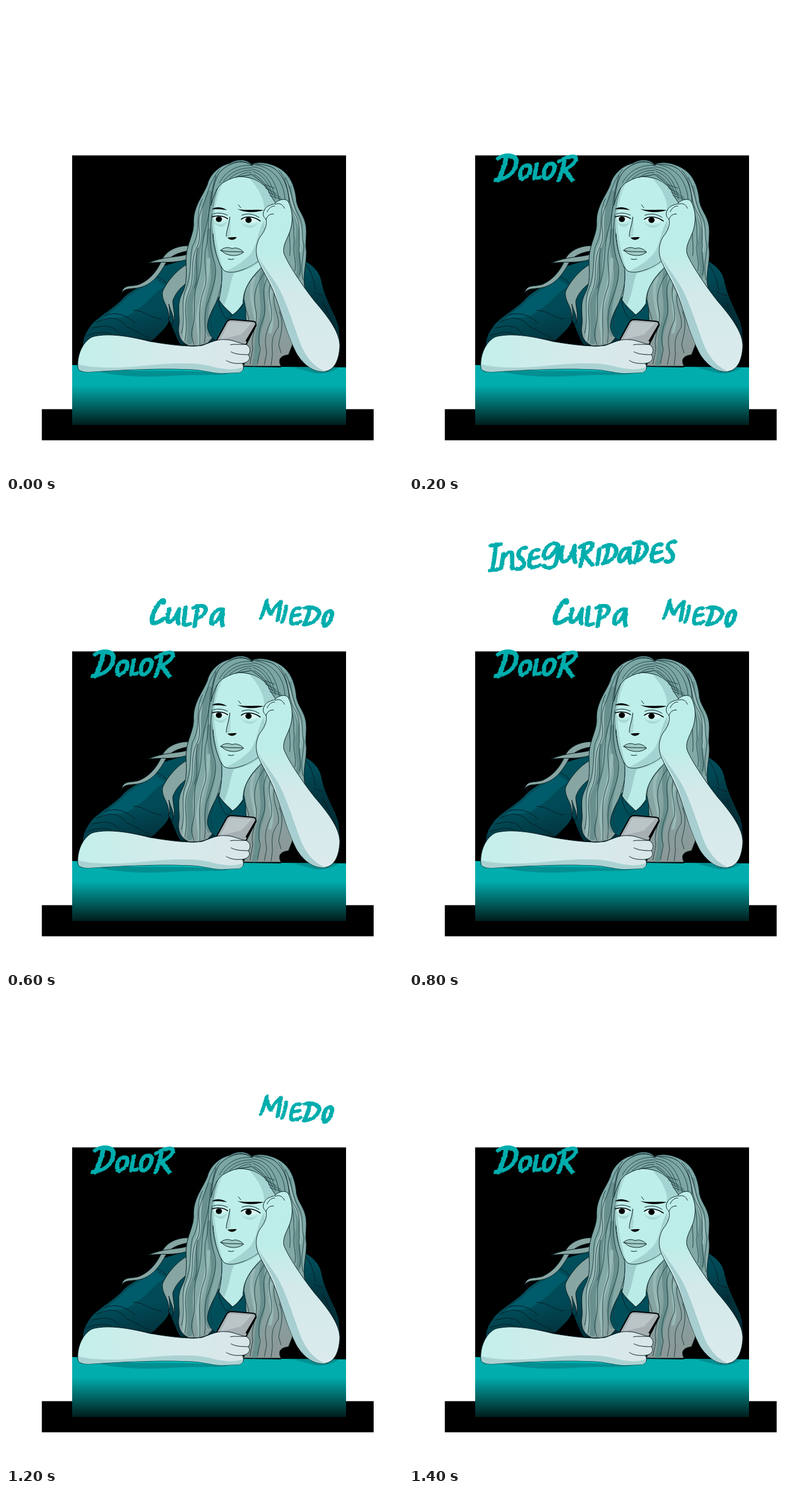
Recreate the animation shown at these times as an HTML page. Size 690 by 812 pixels, loop 1.6 s.

```html
<!DOCTYPE html>
<html lang="es">
<head>
<meta charset="utf-8">
<title>Dolor, miedo, culpa</title>
<style>
html, body { margin: 0; width: 100%; height: 100%; overflow: hidden; background: #fff; }
svg { display: block; width: 690px; height: 812px; }
path { stroke-linecap: round; stroke-linejoin: round; }
.ink { fill: none; stroke: #071c20; stroke-width: 1; }
.edge { stroke: #071c20; stroke-width: 1; }
.strand { fill: none; stroke: #18383b; stroke-width: .9; }
.dark { fill: none; stroke: #688f8e; }
.light { fill: none; stroke: #98bab7; }
.word { fill: none; stroke: #03adad; stroke-width: 5.6; filter: url(#brush); }

.word { opacity: 0; animation: 1.6s step-end infinite; }
.dolor { animation-name: dolor; }
.miedo { animation-name: miedo; }
.culpa { animation-name: culpa; }
.insec { animation-name: insec; }
.scene { animation: nudge 1.6s step-end infinite; }
@keyframes dolor { 0% { opacity: 0 } 12.5%, 100% { opacity: 1 } }
@keyframes miedo { 0%, 87.5%, 100% { opacity: 0 } 25% { opacity: 1 } }
@keyframes culpa { 0%, 75%, 100% { opacity: 0 } 37.5% { opacity: 1 } }
@keyframes insec { 0%, 62.5%, 100% { opacity: 0 } 50% { opacity: 1 } }
@keyframes nudge { 0%, 75%, 100% { transform: none } 62.5% { transform: translateX(-1px) } }
</style>
</head>
<body>
<svg viewBox="0 0 690 812">
<defs>
  <linearGradient id="table" gradientUnits="userSpaceOnUse" x1="0" y1="623" x2="0" y2="727">
    <stop offset=".34" stop-color="#02adad"/><stop offset="1" stop-color="#001c1c"/>
  </linearGradient>
  <linearGradient id="hair" gradientUnits="userSpaceOnUse" x1="380" y1="300" x2="450" y2="620">
    <stop offset="0" stop-color="#7ba7a5"/><stop offset=".6" stop-color="#84a9a6"/><stop offset="1" stop-color="#8b9897"/>
  </linearGradient>
  <linearGradient id="fore">
    <stop offset="0" stop-color="#c3efea"/><stop offset=".6" stop-color="#d7eaeb"/><stop offset="1" stop-color="#d9e6e8"/>
  </linearGradient>
  <linearGradient id="arm" x2="0" y2="1">
    <stop offset=".3" stop-color="#bdede8"/><stop offset=".55" stop-color="#d3e9ea"/><stop offset="1" stop-color="#dcebed"/>
  </linearGradient>
  <linearGradient id="sleeve" gradientUnits="userSpaceOnUse" x1="230" y1="450" x2="260" y2="585">
    <stop offset="0" stop-color="#00505c"/><stop offset=".6" stop-color="#014956"/><stop offset="1" stop-color="#02313b"/>
  </linearGradient>
  <filter id="brush" filterUnits="userSpaceOnUse" x="100" y="40" width="500" height="290">
    <feOffset in="SourceGraphic" dx="1.8" dy="-1.2" result="nib"/>
    <feMerge result="ink"><feMergeNode in="SourceGraphic"/><feMergeNode in="nib"/></feMerge>
    <feTurbulence type="fractalNoise" baseFrequency=".18 .3" numOctaves="2" seed="4" result="grain"/>
    <feDisplacementMap in="ink" in2="grain" scale="3" xChannelSelector="R" yChannelSelector="G"/>
  </filter>
</defs>

<g class="scene">
  <path d="M115 259.300H591V699.400H639V753.600H62.300V699.400H115Z"/>

  <!-- shirt -->
  <path fill="url(#sleeve)" d="M318 438C290 448 262 450 254 468C242 484 214 494 201 510C183 528 154 543 146 557C138 567 133 580 134 590C170 568 210 572 252 581C268 572 279 560 285 548L302 588H480V470L517 441C536 452 546 462 549 482C556 512 571 532 578 557L580 580L530 545L480 480L400 470Z"/>
  <path fill="#006071" opacity=".75" d="M254 470C242 490 216 499 203 513C190 526 173 537 164 546C192 537 210 545 226 527C247 517 253 500 276 486Z"/>
  <path d="M255 581C266 567 278 561 284 545C291 559 293 575 304 588Z"/>
  <g class="ink">
    <path d="M255 468C269 470 278 478 286 492M157 549C180 538 194 538 210 557M150 559C176 552 187 555 198 570M172 537C190 530 208 535 224 550M141 572C158 566 170 564 183 569"/>
    <path d="M210 557C224 562 236 570 251 578M222 528C238 527 252 542 270 543M521 448C530 460 535 475 538 492M535 496C542 500 548 502 553 502M550 515C559 530 566 545 573 560"/>
  </g>

  <!-- loose locks -->
  <g fill="#87a5a2" class="edge">
    <path d="M316 416C295 416 278 426 272 439C263 459 252 474 232 483C216 488 205 482 201 498C207 488 219 492 234 488C256 482 267 464 275 451C283 434 298 428 316 425Z"/>
    <path d="M315 431C294 437 275 434 247 446C272 443 290 447 314 440Z"/>
    <path d="M317 447C298 456 279 479 272 496C270 515 286 521 282 546C286 535 284 525 283 517C286 530 295 541 289 553C297 538 289 525 290 511C295 496 307 485 318 478Z"/>
  </g>

  <!-- hair mass -->
  <path fill="url(#hair)" class="edge" d="M427 275C416 264 400 266 389 273C370 277 354 293 350 310C343 328 326 347 326 374C328 395 314 411 313 438C313 463 316 480 306 499C295 520 304 540 300 558C299 574 305 584 319 590L346 589C360 578 371 555 384 544L420 560C414 588 421 605 412 625H478C472 613 477 607 491 605L497 590L520 490C514 470 523 448 522 425C519 410 524 397 521 380C518 363 508 355 505 340C503 318 497 300 484 288C470 275 442 267 427 275Z"/>
  <g class="dark">
    <path stroke-width="10" d="M354 325C340 360 348 380 338 405C326 433 336 465 325 492C313 520 325 550 319 582"/>
    <path stroke-width="8" d="M353 390C350 425 364 452 359 480C351 512 341 545 354 570M493 315C493 350 515 370 507 405C502 430 514 450 507 470"/>
    <path stroke-width="9" d="M446 462C440 500 452 515 444 548C432 575 440 600 432 621"/>
  </g>
  <g class="light">
    <path stroke-width="6" d="M338 352C331 385 343 397 329 423C320 456 328 474 315 500C303 529 315 550 309 578M352 440C352 470 342 500 336 524C329 552 339 570 336 584"/>
    <path stroke-width="5" d="M468 285C488 300 492 330 500 354C510 380 516 390 511 425M431 472C421 497 430 520 434 544M461 495C454 523 468 540 459 566"/>
  </g>

  <!-- neck and collar -->
  <path fill="#014e5b" class="edge" d="M370 505C364 518 351 537 350 556C352 571 361 579 366 580L425 570C411 548 422 530 412 507Z"/>
  <path fill="#baebe6" class="edge" d="M374 446C377 475 374 495 370 511C377 521 386 530 394 536C403 529 408 522 412 516C412 495 419 478 449 450L440 420Z"/>
  <path fill="#9ecdcc" d="M374 452C378 475 375 495 371 510L379 519C390 495 389 478 396 464C415 460 432 452 443 441L380 440Z"/>
  <path class="ink" d="M370 507C369 523 377 535 383 543M412 518C405 530 392 537 383 543M371 511C380 524 388 529 394 536"/>

  <!-- face -->
  <path fill="#beeeea" class="edge" d="M371 309C362 332 357 360 359 386C359 418 369 448 379 459C390 466 411 459 427 450C440 443 448 434 455 425L470 350C467 327 447 305 426 299C405 293 382 296 371 309Z"/>
  <path fill="#a4d4d2" d="M423 299C445 303 464 324 468 350L448 362C452 338 440 318 423 299ZM449 370C435 398 437 414 425 430C414 442 399 453 382 460C406 463 438 450 453 426Z"/>
  <path fill="#a9d8d5" d="M371 309C359 338 356 375 360 397C362 425 369 445 377 455C369 427 364 402 363 383C361 353 366 330 377 307Z"/>
  <path fill="#a9d7d6" d="M361 374C369 380 377 380 384 374C380 386 367 386 361 374ZM410 376C419 383 431 382 438 376C430 388 416 387 410 376ZM388 367C385 381 382 391 384 401L389 399C390 390 391 377 390 366Z"/>
  <path fill="#dcf7f4" d="M360 368C367 363 378 364 385 369C377 376 366 376 360 368ZM409 370C418 363 431 365 438 373C429 378 416 378 409 370Z"/>
  <ellipse cx="370" cy="370" rx="5.4" ry="4.8"/><ellipse cx="421.500" cy="371.500" rx="5.4" ry="5"/>
  <path fill="none" stroke="#000" stroke-width="1.6" d="M358 366C366 363 378 364 385 369M409 370C418 363 432 366 442 373"/>
  <path class="ink" d="M360 361C367 358 377 359 385 363M410 363C420 359 432 361 440 367M389 366C388 381 382 391 383 400"/>
  <path d="M358 353C364 347 376 349 384 354C375 353 367 352 358 353ZM402 352C418 356 431 352 448 354C436 359 415 359 402 352ZM385 402C389 401 397 401 401 401C398 407 389 407 385 402Z"/>
  <path fill="#a0cbc7" class="edge" d="M373 424C379 418 387 418 393 421C400 418 407 421 413 427C406 433 396 434 388 432C381 431 378 427 373 424Z"/>
  <path class="ink" d="M374 424C385 428 399 425 412 427M386 439Q391 441 396 439M404 345L408 350"/>

  <!-- hair over the brow -->
  <path fill="#7ba6a4" class="edge" d="M427 276C410 265 389 272 375 285C363 296 359 318 356 346C362 326 367 311 380 305C400 293 415 296 427 292C440 302 453 310 459 327L471 346L492 340C491 310 477 284 458 278C445 274 435 274 427 276Z"/>
  <path class="strand" d="M427 277C405 274 382 285 371 307M427 281C408 280 390 288 378 304M427 285C412 284 397 291 388 300M426 289C414 288 406 293 400 298M427 277C417 268 402 267 390 275M428 279C451 280 469 299 475 338M428 283C447 286 462 302 468 335M429 287C444 291 457 306 463 328M431 292C444 300 451 308 459 321M435 276C463 280 483 303 485 336M451 316L470 326M456 323L477 332M459 329L481 336M450 310L467 316"/>

  <!-- strands -->
  <g class="strand">
    <path d="M371 284C351 308 351 330 339 354C329 383 343 394 332 418C318 445 330 470 317 498C306 526 318 545 311 580M365 294C353 330 355 353 348 383C337 416 343 445 334 475C322 506 332 535 324 558C320 573 325 580 327 588"/>
    <path d="M358 338C348 363 354 390 349 413C340 447 353 466 345 490C332 523 338 546 337 587M358 362C353 397 354 418 361 440C370 463 359 491 352 511C341 541 349 561 345 584M360 395C362 425 369 440 375 457C378 480 369 503 364 517C356 538 351 552 362 568"/>
    <path d="M341 335C327 367 341 385 324 417C318 440 324 462 313 490C302 516 313 540 305 568M333 420C327 448 337 466 327 490"/>
    <path d="M446 451C428 469 413 487 414 510C414 526 426 541 422 558C414 580 424 600 414 623M451 460C429 490 430 509 435 532C438 555 424 573 429 595L424 621M455 470C441 497 453 512 449 536C441 559 436 573 442 595L437 621M460 480C452 505 465 523 461 546C447 574 451 585 453 602L449 622M466 499C462 523 477 538 473 558C459 577 463 590 463 605L461 623M475 530C485 554 476 572 474 588L478 602"/>
    <path d="M474 285C493 304 488 334 500 357C514 376 508 398 510 415C507 435 515 451 510 467M485 297C499 321 495 340 507 360C519 379 512 397 518 416C517 437 511 451 516 475M490 347C503 368 499 389 501 410C497 429 506 440 502 460M495 380C489 399 496 410 493 433"/>
  </g>

  <!-- table -->
  <path fill="url(#table)" d="M115 623L591 627V727H115Z"/>
  <path fill="#018f92" d="M150 632L395 635C383 643 340 639 300 641C240 646 190 642 150 632ZM500 627L578 627C569 635 552 639 536 637Z"/>
  <path d="M410 624.500L478 625.500V627L410 626Z"/>

  <!-- propped arm -->
  <path fill="url(#arm)" class="edge" d="M449 354C453 346 461 345 467 343C473 336 486 332 491 340C498 355 499 370 495 386C491 402 480 414 483 429C489 446 514 484 537 513C563 543 582 570 580 593C578 617 570 631 555 634C536 637 516 622 505 602C489 571 480 537 469 506C460 481 449 465 440 446C432 430 434 412 442 400C450 390 454 380 452 370C446 366 446 359 449 354Z"/>
  <path fill="#a7ced0" d="M436 430C446 459 463 477 471 506C480 536 489 571 505 602C517 622 535 636 555 634C534 626 520 607 511 584C496 543 485 506 469 481C457 462 444 447 436 430Z"/>
  <path class="ink" d="M454 357C457 350 462 347 467 347M452 370C454 364 459 360 465 361M468 344C475 341 481 344 484 351"/>

  <!-- phone -->
  <path fill="#a6afb1" stroke="#000" stroke-width="2" d="M383 549Q386 544 392 544L429 547Q436 548 434 555L417 588L365 582Z"/>
  <path fill="#bbc4c6" d="M388 548L428 550L408 570L372 579Z"/>
  <path fill="none" stroke="#000" stroke-width="3" d="M434 554L418 581"/>

  <!-- resting arm -->
  <path fill="url(#fore)" class="edge" d="M150 574C132 583 123 608 125 627C126 637 143 635 160 634C220 630 291 628 330 631C349 633 364 638 381 637L404 636C414 634 414 627 411 620C420 619 427 612 421 605C427 599 424 589 416 587C404 585 394 579 383 579C368 577 355 584 341 589C318 592 286 588 250 582C211 572 175 567 150 574Z"/>
  <path fill="#abd2d3" d="M126 622C124 638 142 635 160 634C220 630 291 628 330 631C349 633 364 638 381 637L404 636C411 635 413 630 411 627C394 633 378 630 360 626C329 617 287 620 250 623C210 628 163 630 126 622Z"/>
  <path class="ink" d="M416 587C405 588 396 586 390 588M421 605C408 605 398 604 391 600M411 620C401 621 390 620 383 615M319 590C333 591 342 588 350 585"/>

  <!-- words -->
  <g class="word dolor" role="img" aria-label="Dolor">
    <path stroke-width="6.500" d="M168 263C165 278 160 292 154 303M154 265C166 256 190 259 185 275C182 291 169 300 150 302"/>
    <path d="M205 277C196 275 190 290 193 299C198 303 209 294 210 283C210 278 207 276 204 278M221 275C220 284 217 294 217 300L226 298M245 274C236 273 231 290 235 299C241 303 251 292 252 281C252 275 248 273 245 274"/>
    <path d="M269 270C266 284 262 295 259 303M260 270C270 263 287 258 289 265C290 272 278 281 269 284C274 290 279 298 283 303"/>
  </g>
  <g class="word miedo" role="img" aria-label="Miedo">
    <path stroke-width="5" d="M442 202C447 192 450 180 452 172C453 183 456 190 459 195C465 185 471 177 477 173C475 184 473 196 471 206M486 181C485 191 482 201 479 209M510 185C502 183 499 187 497 193C494 203 493 211 497 212C502 212 508 211 511 208M497 198L509 196"/>
    <path d="M527 186C525 197 521 206 518 212M518 184C530 181 546 186 543 196C539 207 528 213 517 213M561 190C553 191 549 206 552 215C557 218 565 205 566 195C566 190 563 189 560 190"/>
  </g>
  <g class="word culpa" role="img" aria-label="Culpa">
    <path stroke-width="6.500" d="M273 175C274 168 268 171 262 181C254 193 250 207 255 210C260 212 267 207 273 203"/>
    <path d="M283 186C280 196 278 208 282 209C288 210 295 198 300 186C298 197 296 206 299 212M311 183C310 195 308 206 308 213C312 215 316 213 319 212M332 186C330 196 328 207 327 216M325 184C335 178 348 180 346 189C344 196 337 201 330 203M375 187C363 184 354 200 356 211C362 214 372 200 376 187C374 198 374 207 375 215"/>
  </g>
  <g class="word insec" role="img" aria-label="Inseguridades">
    <path d="M141 76L158 74M150 75C149 90 146 106 144 117M140 119L155 117M163 90C162 100 160 109 159 116M162 99C169 87 176 85 178 91C179 100 177 108 179 116M202 80C195 79 187 87 190 95C196 100 201 104 198 111C195 117 189 118 185 116M224 84C217 82 212 86 210 95C207 106 207 113 212 114C218 114 222 112 226 110M210 100L223 96"/>
    <path d="M257 74C249 69 238 76 234 88C231 98 237 102 245 95C252 88 256 81 258 75C259 90 256 106 251 112C245 116 238 115 233 111M266 78C262 90 262 103 268 104C276 104 283 90 287 76C286 88 285 98 288 105M303 78C302 90 299 104 297 112M296 79C305 71 318 69 318 75C317 82 309 88 303 92C308 98 313 105 318 110M330 82C329 92 327 102 326 109"/>
    <path d="M345 80C344 90 341 100 338 106M337 78C349 71 362 77 359 88C356 99 345 106 336 107M381 81C370 78 362 94 365 103C371 107 379 92 383 81C381 92 381 100 384 106M399 73C398 84 395 95 392 104M390 72C402 67 414 73 412 84C408 95 400 102 390 105M438 75C431 72 425 76 423 85C420 96 420 103 425 104C431 104 435 102 439 99M423 90L437 87M462 70C456 67 447 73 449 81C454 86 460 92 457 99C454 105 449 106 445 103"/>
  </g>
</g>
</svg>
</body>
</html>
```
